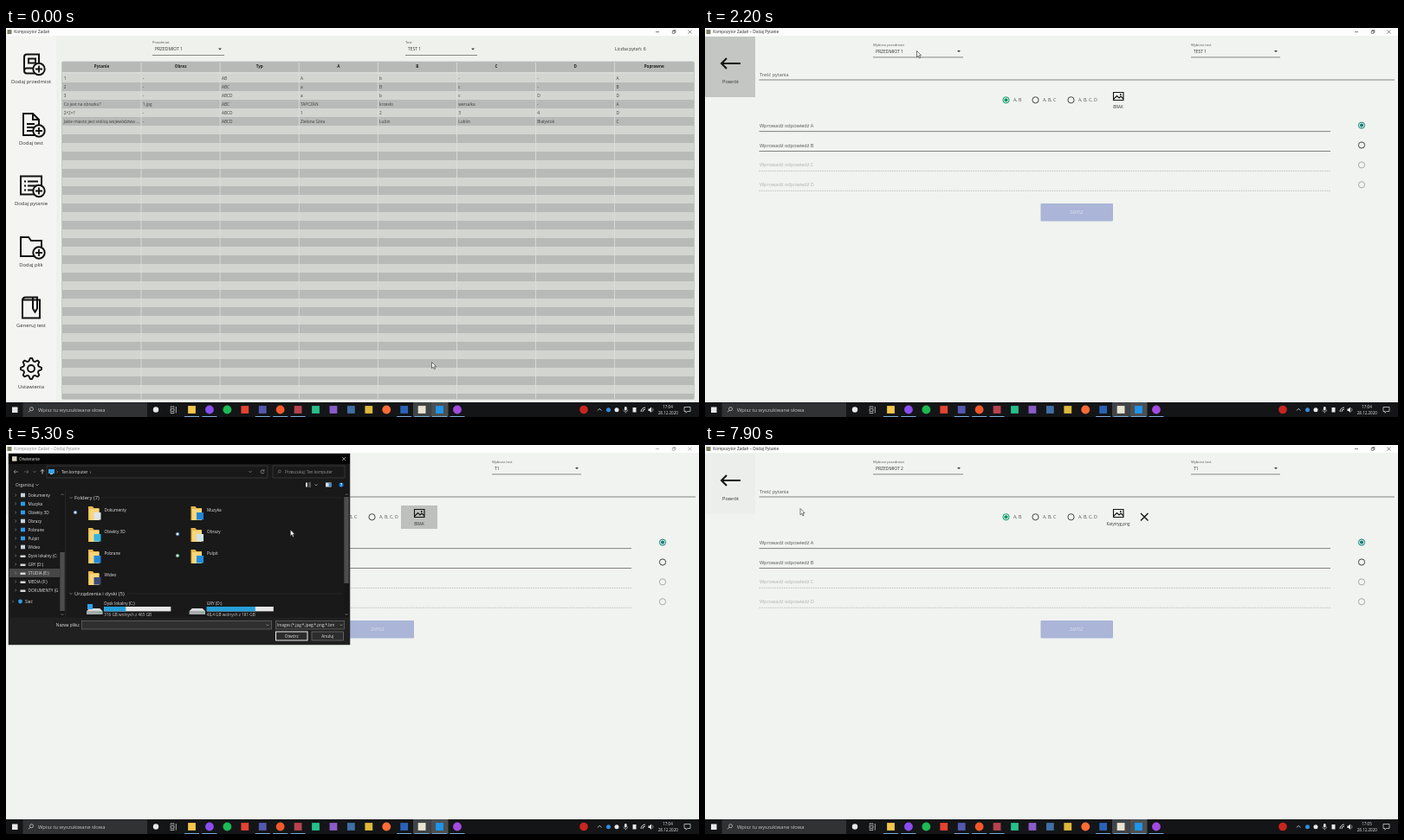
An HTML page that plays this animation: 800 px wide and 450 px high, repeating every 8 s.

```html
<!DOCTYPE html>
<html lang="pl">
<head>
<meta charset="utf-8">
<style>
html, body { margin: 0; width: 100%; height: 100%; overflow: hidden; background: #eff2ee; }
svg { display: block; width: 800px; height: 450px; font-family: "Open Sans", "Noto Sans", sans-serif; }
text { white-space: pre; }
</style>
</head>
<body>
<svg id="stage" viewBox="0 0 800 450"></svg>
<script>
const LOOP = 8000, STEP = 100;
const DARK = '#30322f', LIGHT = '#e4e4e4';

// Markup helpers
const T = (x, y, s, size = 4.7, fill = DARK, more = '') =>
  `<text x="${x}" y="${y}" font-size="${size}" fill="${fill}" ${more}>${s}</text>`;
const R = (x, y, w, h, fill, more = '') =>
  `<rect x="${x}" y="${y}" width="${w}" height="${h}" fill="${fill}" ${more}/>`;
const P = (d, stroke = DARK, w = 0.7, more = '') =>
  `<path d="${d}" fill="none" stroke="${stroke}" stroke-width="${w}" ${more}/>`;
const C = (x, y, r, fill, more = '') => `<circle cx="${x}" cy="${y}" r="${r}" fill="${fill}" ${more}/>`;
const G = (id, body, more = '') => `<g id="${id}" ${more}>${body}</g>`;
const at = (x, y, body) => `<g transform="translate(${x} ${y})">${body}</g>`;
const MID = 'text-anchor="middle"', BOLD = 'font-weight="700"';

const controls = (min, max, close, y, color) =>
  P(`M${min - 2} ${y}h4M${max - 1.7} ${y - 1}h2.7v2.7h-2.7zm1 0v-1h2.7v2.7h-1` +
    `M${close - 2} ${y - 2}l4 4m0-4l-4 4`, color, 0.6);
const chevron = (x, y, color = '#aaa') => P(`M${x - 1.5} ${y - 0.8}l1.5 1.5l1.5-1.5`, color, 0.6);
const angle = (x, y, color = '#999') => P(`M${x - 0.7} ${y - 1.5}l1.5 1.5l-1.5 1.5`, color, 0.6);

// Combo box: label, value, arrow, underline
const combo = (id, x, y, w, label, value) =>
  T(x, y, label, 4.1, '#555') +
  T(x + 3, y + 8, value, 5, DARK, `id="${id}"`) +
  `<path d="M${x + w - 7} ${y + 5.4}h4l-2 2.2z" fill="#333"/>` +
  R(x, y + 13, w, 0.8, '#6d6f6c', `id="${id}Line"`);

// Start screen
const plus = (x, y) => C(x, y, 6.7, '#f3f4f2', 'stroke="#111" stroke-width="2"') +
  P(`M${x - 4} ${y}h8M${x} ${y - 4}v8`, '#111', 1.8);

const gear = () => {
  let d = '';
  for (let i = 0; i < 32; i++) {
    const a = (i + 0.5) * Math.PI / 16 - Math.PI / 2, r = i % 4 === 0 || i % 4 === 3 ? 12 : 9;
    d += (i ? 'L' : 'M') + (r * Math.cos(a)).toFixed(2) + ' ' + (r * Math.sin(a)).toFixed(2);
  }
  return P(d + 'z', '#111', 1.9, 'stroke-linejoin="round"') + C(0, 0, 4, 'none', 'stroke="#111" stroke-width="1.9"');
};

const icons = [
  P('M-8 7v-15q0-3 3-3h14v19M-8 8q0-3 3-3h14M-8 8q0 3 3 3h9M-3-6h8v5h-8z', '#111', 2) + plus(9, 6),
  P('M-9-13h11l7 7v18h-18zM2-13v7h7M-5-1h9M-5 3h9M-5 7h7', '#111', 2) + plus(9, 7),
  P('M-12-11h24v21h-24zM-8-5h2M-4-5h12M-8 0h2M-4 0h12M-8 5h2M-4 5h8', '#111', 2) + plus(9, 6),
  P('M-12-11h9l3 4h12v18h-24z', '#111', 2) + plus(9, 7),
  P('M-10-9h20v21h-20zM-10-8q0-4 4-4h12M2-12h5v13l-2.5 4l-2.5-4z', '#111', 2),
  gear()
];
const labels = ['Dodaj przedmiot', 'Dodaj test', 'Dodaj pytanie', 'Dodaj plik', 'Generuj test', 'Ustawienia'];
const heads = ['Pytanie', 'Obraz', 'Typ', 'A', 'B', 'C', 'D', 'Poprawne'];
const cells = [
  '1|-|AB|A|b|-|-|A',
  '2|-|ABC|a|B|c|-|B',
  '3|-|ABCD|a|b|c|D|D',
  'Co jest na obrazku?|1.jpg|ABC|TAPCZAN|krzesło|wersalka|-|A',
  '2+2=?|-|ABCD|1|2|3|4|D',
  'Jakie miasto jest stolicą województwa ...|-|ABCD|Zielona Góra|Lubin|Lublin|Białystok|C'
];

function home() {
  const col = i => 65 + i * 91.1;
  let s = R(0, 9, 800, 425, '#eff1ed') + R(0, 9, 58, 425, '#f4f5f3') +
    R(0, 151, 58, 70, '#c4c7c3', 'id="sideHover"');
  icons.forEach((icon, i) => {
    s += at(29, 41.5 + i * 70.5, icon) + T(29, 64 + i * 70.5, labels[i], 5.9, DARK, MID);
  });
  s += combo('s0', 169, 18, 83, 'Przedmiot', 'PRZEDMIOT 1') + combo('t0', 461, 18, 83, 'Test', 'TEST 1') +
    T(703, 26.3, 'Liczba pytań: 6', 5.2);
  s += R(64, 38.5, 731, 391.5, '#c6c8c5', 'rx="2"') + R(65, 39, 729, 12, '#b7b9b6', 'rx="1.5"') +
    R(65, 51, 729, 2, '#d9dbd8');
  for (let i = 0; i < 38; i++) s += R(65, 53 + i * 10, 729, i < 37 ? 10 : 6, i % 2 ? '#b8bab7' : '#d3d5d1');
  heads.forEach((h, i) => {
    s += T(col(i) + 45.5, 46.3, h, 4.6, '#222', MID + ' ' + BOLD);
    if (i) s += R(col(i) - 0.5, 40, 0.8, 389, '#dee0dd');
  });
  cells.forEach((row, r) => row.split('|').forEach((v, i) => {
    s += T(col(i) + 1.7, 59.8 + r * 10, v, 4.75, '#3a3c39');
  }));
  return s;
}

// Question form
const radio = (x, y, on, color) => C(x, y, 3.6, 'none', `stroke="${color}" stroke-width="1"`) +
  (on ? C(x, y, 2.1, color) : '');

function form() {
  let s = R(0, 9, 800, 425, '#f0f3ef') + R(0, 10, 58, 70, '#ebeeea') + R(0, 10, 58, 70, '#c3c6c2', 'id="backHover"') +
    P('M41 41h-22M25 35l-6 6l6 6', '#111', 2) + T(29.5, 64, 'Powrót', 5.7, DARK, MID) +
    combo('subj', 194, 20.5, 104, 'Wybierz przedmiot', '') + combo('test', 561, 20.5, 103, 'Wybierz test', '') +
    T(63, 55.5, 'Treść pytania', 5.5, '#555') + R(62.5, 59.6, 733.5, 0.8, '#666');
  ['A, B', 'A, B, C', 'A, B, C, D'].forEach((v, i) => {
    const x = [347.5, 381.5, 422.5][i];
    s += radio(x, 83.3, !i, i ? '#444' : '#0b9a6a') + T(x + 8.5, 85.3, v, 5.3, '#555');
  });
  s += R(456, 70, 42, 27, '#cfd2ce', 'id="imgHover"') +
    P('M471.5 74.5h11.5v9h-11.5zM472 82l3.5-3.5l2.5 2.5l2-2l3 3', '#111', 1.1) + C(479.8, 77, 0.9, '#111') +
    T(477, 93.3, 'BRAK', 4.6, DARK, MID + ' id="imgName"') +
    G('clear', P('M503 79l8.5 8.5m0-8.5l-8.5 8.5', '#111', 1.3));
  [...'ABCD'].forEach((c, i) => {
    const y = 112.6 + i * 22.9, off = i > 1;
    s += T(63, y + 2, 'Wprowadź odpowiedź ' + c, 5.6, off ? '#b0b2af' : '#555') +
      P(`M62.5 ${y + 7}H722`, off ? '#b5b7b4' : '#666', 0.8, off ? 'stroke-dasharray="1.6 1"' : '') +
      radio(758, y, !i, off ? '#aaa' : i ? '#444' : '#14807a');
  });
  s += R(387.5, 203, 83.5, 20.5, '#aab5d7', 'rx="1"') + T(429, 215.4, 'ZAPISZ', 4.8, '#dfe4f0', MID);
  const list = (id, x, items) => G(id, R(x, 34, 104, items.length * 11 + 2, '#fafbf9', 'stroke="#c8cac7" stroke-width=".6"') +
    items.map((v, i) => (i === items.length - 1 ? R(x, 35 + i * 11, 104, 11, '#d5d8d4') : '') +
      T(x + 3, 42.3 + i * 11, v, 5)).join(''));
  return s + list('subjList', 194, ['PRZEDMIOT 1', 'PRZEDMIOT 2']) + list('testList', 561, ['T1']);
}

// File picker
const folder = (x, y, tint) => `<path d="M${x} ${y}h5l1.5 2h6v14h-12.5z" fill="#e8b84e"/>` +
  R(x + 1.5, y + 3, 11, 13, '#f7d67c') + R(x + 6.5, y + 7, 8, 8.5, tint);
const disk = (x, y) => `<path d="M${x} ${y + 4}l3-3h12l3 3v4h-18z" fill="#d8dadc"/>` +
  R(x, y + 4, 18, 4, '#a7abad') + R(x + 14, y + 5.3, 2, 1.2, '#3c5');

function dialog() {
  let s = R(3, 10, 394, 221, '#191919', 'stroke="#4a4a4a" stroke-width=".6"') + R(3, 10, 394, 12, '#050505') +
    R(7, 13.2, 5.5, 5.5, '#d9d6c4') + T(15, 17.8, 'Otwieranie', 4.7, LIGHT) + P('M388 14l4 4m0-4l-4 4', LIGHT, 0.6) +
    P('M14 31h-5m2-2l-2 2l2 2', '#999', 0.8) + P('M21 31h5m-2-2l2 2l-2 2', '#666', 0.8) + chevron(33, 31) +
    P('M42 33.5v-5m-2 2l2-2l2 2', LIGHT, 0.8) +
    R(47, 24, 255, 14, '#191919', 'stroke="#484848" stroke-width=".6"') + R(49, 28, 7, 5, '#3aa0e8') + R(51, 33, 3, 1, '#ccc') +
    angle(59, 31) + T(64, 32.8, '', 4.7, LIGHT, 'id="path"') + chevron(282, 31) +
    P('M297.7 29.6a2 2 0 1 0 .3 2M298 28.3v1.7h-1.7', '#bbb', 0.6) +
    R(308, 24, 83, 14, '#191919', 'stroke="#484848" stroke-width=".6"') + C(316, 30.4, 1.4, 'none', 'stroke="#999" stroke-width=".5"') +
    P('M315 31.5l-1.4 1.4', '#999', 0.5) + T(322, 32.8, 'Przeszukaj: Ten komputer', 4.6, '#999', 'id="find"') +
    T(11, 47.8, 'Organizuj', 4.7, LIGHT) + chevron(36, 46.2, LIGHT) +
    R(346, 43.5, 2, 5, '#ddd') + P('M349 44h3M349 46h3M349 48h3', '#ddd', 0.6) + chevron(358, 46.2, LIGHT) +
    R(369, 43.5, 6.5, 5, '#ddd') + R(372.5, 44, 2.7, 4, '#2f8fe0') + C(387, 46, 2.6, '#1677d2') + T(387, 47.8, '?', 4.5, '#fff', MID + BOLD) +
    R(4, 143, 58, 10, '#474747');
  ['Dokumenty', 'Muzyka', 'Obiekty 3D', 'Obrazy', 'Pobrane', 'Pulpit', 'Wideo', 'Dysk lokalny (C:',
    'GRY (D:)', 'STUDIA (E:)', 'MEDIA (F:)', 'DOKUMENTY (G'].forEach((v, i) => {
    const y = 58 + i * 10;
    s += angle(11, y) + (i > 6 ? R(16.5, y - 0.5, 6, 2.5, '#d5d8da') : R(17, y - 2.3, 5, 4.6, i % 3 ? '#2f9bea' : '#c5d2dc')) +
      T(25.5, y + 1.7, v, 4.7, LIGHT);
  });
  s += angle(8, 181) + C(16.5, 181, 2.4, '#2f9bea') + T(22, 182.7, 'Sieć', 4.7, LIGHT) +
    R(62, 53, 6, 146, '#171717') + R(62.3, 124, 5.4, 68, '#4d4d4d') + P('M63.5 58l1.5-1.5l1.5 1.5', '#999', 0.6) + chevron(65, 196) +
    R(68.5, 53, 0.6, 146, '#333');

  let pc = chevron(75, 61) + T(79, 63, 'Foldery (7)', 5.9, LIGHT) + P('M110 61H388M140 172H388', '#2c2c2c', 0.5);
  ['Dokumenty', 'Muzyka', 'Obiekty 3D', 'Obrazy', 'Pobrane', 'Pulpit', 'Wideo'].forEach((v, i) => {
    const x = i % 2 * 118.5, y = 71 + (i >> 1) * 25;
    pc += folder(95 + x, y, ['#dfe6ea', '#1f86d8', '#35b4e0', '#cfe4ea', '#2188dc', '#1e8fe6', '#3c4a78'][i]) +
      T(113.5 + x, y + 5.7, v, 4.7, LIGHT);
  });
  [[80, 78, '#4b86c4'], [198, 103, '#4b86c4'], [198, 128, '#3b9a6a']].forEach(([x, y, c]) => {
    pc += C(x, y, 1.8, '#e8eef2', `stroke="${c}" stroke-width=".8"`);
  });
  pc += chevron(75, 172) + T(79, 174, 'Urządzenia i dyski (5)', 5.9, LIGHT);
  [['Dysk lokalny (C:)', '316 GB wolnych z 465 GB', 25], ['GRY (D:)', '48,4 GB wolnych z 181 GB', 56]].forEach(([n, free, w], i) => {
    const x = 113.3 + i * 118.5;
    pc += disk(x - 20, 188) + (i ? '' : R(94, 184, 6, 6, '#2fa3ee')) + T(x, 185, n, 4.7, LIGHT) +
      R(x, 187, 77, 5.4, '#e6e6e6') + R(x, 187, w, 5.4, '#26a0da') + T(x, 197.6, free, 4.65, '#ccc');
  });
  pc += R(390, 53, 6, 146, '#171717') + R(390.3, 60, 5.4, 100, '#4d4d4d') + P('M391.7 58l1.5-1.5l1.5 1.5', '#999', 0.6) + chevron(393, 196);

  const drive = R(74, 66, 130, 20, '#303030', 'id="fileHover"') + R(94, 68, 22, 15, '#f5f6f5') +
    P('M96 80.5l17-9.5v9.5z', '#222', 0.7) + T(120, 77.5, 'Katytryg.png', 4.7, LIGHT);

  return s + `<clipPath id="pane"><path d="M69 53h328v146h-328z"/></clipPath>` +
    `<g clip-path="url(#pane)">${G('pc', pc)}${G('drive', drive)}</g>` +
    R(3.3, 199.5, 393.4, 31.2, '#202020') + T(85.5, 210.2, 'Nazwa pliku:', 4.7, LIGHT, 'text-anchor="end"') +
    R(87.5, 203.5, 219, 9.5, '#2f2f2f', 'stroke="#777" stroke-width=".6"') + chevron(302, 208.3) +
    T(90, 210.2, '', 4.7, LIGHT, 'id="fileName"') +
    R(311.5, 203.5, 79, 9.5, '#2c2c2c', 'stroke="#777" stroke-width=".6"') + T(313, 210, 'Images (*.jpg;*.jpeg;*.png;*.bm', 4.5, LIGHT) + chevron(387, 208.3) +
    R(311.5, 216, 36.5, 10, '#2c2c2c', 'stroke="#eee" stroke-width="1"') + T(329.7, 222.7, 'Otwórz', 4.7, LIGHT, MID) +
    R(353, 216, 36.5, 10, '#2c2c2c', 'stroke="#888" stroke-width=".6"') + T(371.3, 222.7, 'Anuluj', 4.7, LIGHT, MID);
}

// Picture viewer, drawn at VIEW_SCALE with its corner at (22, 18)
const VIEW_SCALE = 0.9625;
function viewer() {
  const w = '#f2f2f2', ink = '#1c1c1c';
  return R(22, 18, 770, 417, '#202020') + T(26, 27, 'Obrazki — Katy_tryg.png', 4.5, w) + controls(747, 765, 783, 25, w) +
    R(22, 32, 71, 19, '#1583dc') + R(27, 38.5, 6, 5, w) + P('M27.5 43l2-2l1.5 1l2-2', '#1583dc', 0.6) +
    T(36, 42.8, 'Zobacz wszystkie obrazki', 4.5, w) + P('M98 41h6.5M101.2 37.8v6.5', w, 0.7) + T(107, 42.8, 'Dodaj do', 4.6, w) +
    C(366, 40.4, 2.3, 'none', `stroke="${w}" stroke-width=".8"`) +
    P('M367.7 42l2.5 2.5M365 40.4h2M384.3 39h5.4M386 39v-1.2h2V39M385 39.5v5h4v-5M387 40.5v3', w, 0.8) +
    P('M407 44l-3-3q-1-3 1.5-3q1 0 1.5 1q.5-1 1.5-1q2.500 0 1.500 3z', '#aaa', 0.7) +
    P('M425 39a3 3 0 1 1 0 4.200M424.500 37v2.500h2.500M445.500 37.500v5.500h5.500M444 39.500h5.500v5.500', w, 0.8) +
    P('M660 38.5l5 5.500m0-5.500l-5 5.500', w, 1) + T(669, 42.8, 'Edytuj i utwórz', 4.5, w) + chevron(705, 41, '#4aa3ea') +
    P('M717 40v4h4.500v-2M718 42q0-3 4-3m-1.700-1.700l1.700 1.700l-1.700 1.700', w, 0.7) + T(726, 42.8, 'Udostępnij', 4.5, w) +
    P('M762 40v-2h4v2M761 40h6v3h-6zM762 43v1.500h4V43', w, 0.7) + [780.5, 783, 785.5].map(x => C(x, 41, 0.5, w)).join('') +
    P('M780 430l6.500-6M783.500 424h3v3M783 430h-3v-3', w, 0.8) +
    R(251, 149, 312.5, 177, '#fbfdfc') +
    P('M253 296.500L541 150.500V296.500z', ink, 2.4) +
    P('M323 259Q344 274 333 296M541 254.500Q505 262 493 296', '#41618f', 1.3) + C(521.5, 281, 5.6, ink) +
    T(398, 216, 'c', 13, ink, MID + ' ' + BOLD) + T(550, 228.500, 'a', 13, ink, MID + ' ' + BOLD) +
    T(408, 313.500, 'b', 13, ink, MID + ' ' + BOLD) + T(305, 287, 'α', 15, ink, MID);
}

function taskbar() {
  const w = '#e8e8e8';
  let s = R(0, 433, 800, 17, '#131517') + R(7, 438.5, 6.5, 6.500, w) + R(19.5, 433.500, 143.500, 16.500, '#303234') +
    C(29.5, 440.700, 2, 'none', 'stroke="#ddd" stroke-width=".7"') + P('M28 442.300l-2 2', '#ddd', 0.8) +
    T(37, 443.700, 'Wpisz tu wyszukiwane słowa', 5.85, '#c8c8c8') + C(173, 441.5, 3.2, w) +
    P('M190 439v-1h4v1M190 440.300h4v3h-4zM190 444.500v1h4v-1M196.300 438v7.500', w, 0.7) +
    R(470, 433, 20.500, 17, '#414446', 'id="appSlot"') + R(490.5, 433, 20, 17, '#4c5052');
  ['#f3c64b', '#8a4df0', '#1db954', '#e44332', '#5558af', '#f2582a', '#b8434f', '#25c08a', '#8a5cc8', '#3f6fa6',
    '#e0b93a', '#ff6c37', '#2b62b8', '#e9e4d2', '#1f95ea', '#a34be0'].forEach((c, i) => {
    const x = 214.5 + i * 20.43;
    s += [1, 2, 5, 11, 15].includes(i) ? C(x, 441.5, 4.9, c) : R(x - 4.4, 437.1, 8.8, 8.8, c);
    if ([0, 1, 4, 5, 6].includes(i) || i > 11) s += R(x - 8.5, 449, 17, 1, '#78a9d8');
  });
  return s + C(667, 441.5, 4.8, '#c8251f') + P('M683 442.500l2.200-2.200l2.200 2.200', w, 0.8) + C(695.5, 441.8, 2.5, '#2f8de0') + C(705, 441.8, 2.5, w) +
    R(714, 438, 2.600, 4.500, w, 'rx="1.3"') + P('M712.800 441.500q0 2.500 2.500 2.500t2.500-2.500M715.300 444v1.500', w, 0.5) +
    R(723.500, 439, 4, 5.500, w) + P('M733 444a5 5 0 0 1 5-5M735 444a3 3 0 0 1 3-3', w, 0.9) +
    `<path d="M741.500 440.500h1.500l2-2v6.500l-2-2h-1.500z" fill="${w}"/>` + P('M746 439.500q2 2.200 0 4.400', w, 0.6) +
    T(764, 439.900, '', 4.5, w, MID + ' id="clock"') + T(764.3, 447.4, '28.12.2020', 4.5, w, MID) +
    P('M783 438.500h7v5h-3.500l-1.500 1.700v-1.700h-2z', w, 0.7);
}

document.getElementById('stage').innerHTML =
  G('home', home()) + G('form', form()) +
  R(0, 0, 800, 9, '#fdfdfd') + R(1.5, 2, 5, 5, '#7c8264') +
  G('bar', T(9.3, 6.4, '', 4.65, '#222', 'id="title"') + controls(752, 771, 789.5, 4.5, '#333')) +
  G('dialog', dialog()) + G('viewer', viewer()) + taskbar() +
  G('cursor', '<path d="M0 0v7.200l1.700-1.500l1.200 2.700l1.200-.6l-1.200-2.600h2.200z" fill="#fff" stroke="#222" stroke-width=".6"/>');

const $ = id => document.getElementById(id);
const show = (id, on) => { $(id).style.display = on ? '' : 'none'; };
const write = (id, s) => { $(id).textContent = s; };

// Keys are [time, ...values]
function tween(keys, t, ease = k => k) {
  const i = keys.findIndex(k => k[0] > t);
  if (i < 0) return keys[keys.length - 1].slice(1);
  if (!i) return keys[0].slice(1);
  const [a, b] = [keys[i - 1], keys[i]], k = ease((t - a[0]) / (b[0] - a[0]));
  return a.slice(1).map((v, j) => v + (b[j + 1] - v) * k);
}
const smooth = k => k * k * (3 - 2 * k);

const pointer = [
  [0, 491.5, 386.5], [200, 499, 439], [300, 499, 439], [500, 462.5, 377.500], [750, 470, 384], [950, 499, 438],
  [1050, 499, 438], [1200, 479, 367.500], [1550, 32, 190], [1850, 32, 190], [2200, 244.5, 26.5], [2400, 243, 27],
  [2600, 228, 50], [2800, 228, 50], [3300, 612, 28], [3600, 612, 28], [3800, 592, 40], [3950, 592, 40],
  [4300, 483, 85], [5000, 483, 85], [5700, 90, 118], [6100, 55, 131], [6250, 44, 147], [6500, 44, 147],
  [7100, 112, 75], [7900, 110, 73.5]
];
// x, y, scale, opacity
const viewerKeys = [
  [300, 140, 125, 0.78, 0], [500, 22, 18, VIEW_SCALE, 0.88], [600, 0, 0, 1, 1],
  [1050, 0, 0, 1, 1], [1200, 118, 103, 0.805, 0.6], [1320, 200, 180, 0.66, 0]
];

function draw(t) {
  const within = (a, b) => t >= a && t < b;
  const onForm = t >= 1900, picking = within(4900, 7600), inDrive = t >= 6400, done = t >= 7600;
  show('home', !onForm);
  show('form', onForm);
  show('sideHover', within(1500, 1900));
  $('backHover').style.opacity = tween([[2200, 1], [2500, 0]], t)[0];
  write('title', 'Kompozytor Zadań' + (onForm ? ' – Dodaj Pytanie' : ''));
  $('bar').style.opacity = picking || within(300, 1100) ? 0.55 : 1;

  write('subj', t < 2800 ? 'PRZEDMIOT 1' : 'PRZEDMIOT 2');
  write('test', t < 2800 ? 'TEST 1' : t < 3900 ? '' : 'T1');
  $('subjLine').setAttribute('fill', within(2400, 3400) ? '#3f51b5' : '#6d6f6c');
  $('testLine').setAttribute('fill', within(3400, 4600) ? '#3f51b5' : '#6d6f6c');
  show('subjList', within(2400, 2800));
  show('testList', within(3500, 3900));
  show('imgHover', within(4200, 7600));
  $('imgHover').setAttribute('fill', t < 4500 ? '#cfd2ce' : '#bdc0bc');
  write('imgName', done ? 'Katytryg.png' : 'BRAK');
  show('clear', done);

  show('dialog', picking);
  show('pc', !inDrive);
  show('drive', inDrive);
  show('fileHover', t >= 7000);
  write('path', 'Ten komputer  ›' + (inDrive ? '  STUDIA (E:)  ›' : ''));
  write('find', 'Przeszukaj: ' + (inDrive ? 'STUDIA (E:)' : 'Ten komputer'));
  write('fileName', t >= 7300 ? 'Katytryg.png' : '');

  const [x, y, s, alpha] = tween(viewerKeys, t);
  show('viewer', alpha > 0);
  $('viewer').style.opacity = alpha;
  $('viewer').setAttribute('transform', `translate(${x} ${y}) scale(${s / VIEW_SCALE}) translate(-22 -18)`);
  show('appSlot', !within(300, 1300));
  write('clock', t < 6300 ? '17:04' : '17:05');
  $('cursor').setAttribute('transform', `translate(${tween(pointer, t, smooth).join(' ')})`);
}

function tick(now) {
  draw(Math.floor(now % LOOP / STEP) * STEP);
  requestAnimationFrame(tick);
}
draw(0);
requestAnimationFrame(tick);
</script>
</body>
</html>
```
